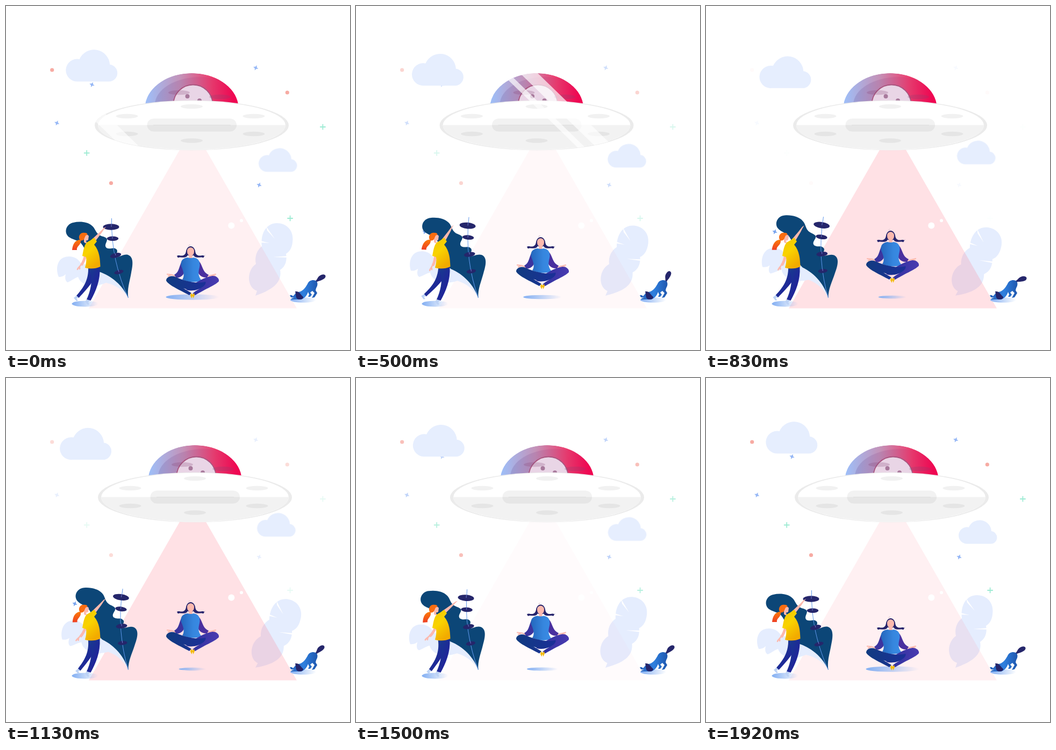
Write an HTML page that moves like this. It is 640 by 640 pixels and loops after 1.96 s.

```html
<!DOCTYPE html>
<html lang="en">
<head>
<meta charset="utf-8">
<style>
  html, body { margin: 0; width: 100%; height: 100%; overflow: hidden; background: #fff; }
  svg { display: block; width: 100vw; height: 100vh; }
</style>
</head>
<body>
<svg viewBox="0 0 640 640">
  <defs>
    <linearGradient id="shade"><stop stop-color="#82aef2"/><stop offset="1" stop-color="#82aef2" stop-opacity="0"/></linearGradient>
    <linearGradient id="glass"><stop offset=".02" stop-color="#9fbdf6"/><stop offset=".38" stop-color="#c492b8"/><stop offset=".72" stop-color="#ee3a6c"/><stop offset=".95" stop-color="#f5044f"/></linearGradient>
    <linearGradient id="inner"><stop stop-color="#6a5ca0" stop-opacity=".25"/><stop offset=".6" stop-color="#b03070" stop-opacity=".14"/><stop offset="1" stop-color="#f5004f" stop-opacity=".3"/></linearGradient>
    <linearGradient id="shirt"><stop stop-color="#2467bd"/><stop offset=".6" stop-color="#3686de"/><stop offset="1" stop-color="#3a8ce6"/></linearGradient>
    <linearGradient id="yellow" x2=".5" y2="1"><stop stop-color="#f0c400"/><stop offset=".5" stop-color="#f9d300"/><stop offset="1" stop-color="#f2ab00"/></linearGradient>
    <linearGradient id="pants" y2="1"><stop stop-color="#15408c"/><stop offset="1" stop-color="#2517a0"/></linearGradient>
    <linearGradient id="fold"><stop stop-color="#113b80"/><stop offset="1" stop-color="#1b2f98"/></linearGradient>
    <linearGradient id="fold2"><stop stop-color="#2a2f9b"/><stop offset="1" stop-color="#493bb0"/></linearGradient>
    <linearGradient id="hair" x2="0" y2="1"><stop stop-color="#fb7b08"/><stop offset="1" stop-color="#ee3f24"/></linearGradient>
    <linearGradient id="fur"><stop stop-color="#2560b8"/><stop offset=".5" stop-color="#2f80df"/><stop offset="1" stop-color="#1f57ae"/></linearGradient>
    <path id="bubble" d="M259 182A87.300 66 0 0 1 432 182Z"/>
    <clipPath id="dome"><use href="#bubble"/></clipPath>
    <clipPath id="hull"><use href="#bubble"/><ellipse cx="345.500" cy="222" rx="180" ry="46"/></clipPath>
    <clipPath id="low"><path d="M160 221.500H530V270H160Z"/></clipPath>
    <path id="cloud" d="M21 58.500A21 21 0 1 1 24 17A29.500 29.500 0 0 1 80.500 27A15.800 15.800 0 0 1 79 58.500Z"/>
    <path id="star" d="M0-5L1.500-1.500L5 0L1.500 1.500L0 5L-1.500 1.500L-5 0L-1.500-1.500Z" transform="rotate(22)"/>
    <path id="plus" d="M-5.300 0H5.300M0-5.300V5.300" stroke="#9debd3" stroke-width="1.800"/>
    <circle id="dot" r="3.600"/>
  </defs>

  <g id="dots" fill="#f7aba3"></g>
  <g id="stars" fill="#97b8f6"></g>
  <g id="pluses"></g>
  <use id="cloudA" href="#cloud" fill="#e6eefe"/>
  <use id="cloudB" href="#cloud" fill="#e6eefe"/>

  <!-- right plant and the light beam over it -->
  <g id="plant">
    <path fill="#e5edfe" d="M464 539L467 530C448 524 447 492 465 480C462 466 467 454 476 447C473 422 485 404 504 404C522 404 534 417 533.500 434C533 448 529 456 521 461C523 472 521 484 510 491C513 509 505 525 464 539Z"/>
    <path fill="#fff" d="M484 410L500 433L486 418ZM474 437L490 441L474 440ZM497 467L524 465V468Z"/>
  </g>
  <path id="beam" fill="#ff697d" d="M324 266H371L541 562.500H154Z"/>
  <g fill="#fff"><circle cx="419.300" cy="408.500" r="6"/><circle cx="438" cy="399.300" r="3"/></g>

  <!-- saucer -->
  <g id="ufo">
    <g clip-path="url(#dome)">
      <use href="#bubble" fill="url(#glass)"/>
      <ellipse cx="362" cy="184" rx="85" ry="52" fill="url(#inner)"/>
      <circle cx="348" cy="183" r="36.500" fill="#e9d5e6" stroke="#a9557f" stroke-width="1.800"/>
      <g fill="#a8799c"><circle cx="337.500" cy="168" r="4"/><circle cx="360" cy="176" r="4"/></g>
      <g fill="#804070" fill-opacity=".24"><ellipse cx="322" cy="161" rx="20" ry="4.300"/><ellipse cx="398" cy="169" rx="20" ry="4.300"/></g>
    </g>
    <ellipse cx="345.500" cy="222" rx="180.500" ry="46.500" fill="#ebebeb"/>
    <ellipse cx="345.500" cy="222" rx="174.500" ry="45.500" fill="#fff"/>
    <ellipse cx="345.500" cy="222" rx="174.500" ry="45" fill="#f2f2f2" clip-path="url(#low)"/>
    <rect x="262.500" y="209.500" width="166.500" height="24" rx="12" fill="#f2f2f2"/>
    <rect x="262.500" y="209.500" width="166.500" height="24" rx="12" fill="#e6e6e6" clip-path="url(#low)"/>
    <path d="M274 221.500H418" stroke="#dcdcdc" stroke-width=".8"/>
    <g id="spots" fill-opacity=".055"></g>
    <g clip-path="url(#hull)"><path id="shine" fill="#fff" fill-opacity=".68" d="M91 120H124L278.500 270H245.500ZM56 120H70L224.500 270H210.500Z"/></g>
  </g>

  <!-- girl with spinning plates -->
  <ellipse cx="147" cy="554" rx="24.500" ry="5.500" fill="url(#shade)"/>
  <use href="#star" fill="#7aa5ee" transform="translate(128 420)"/>
  <g id="leaf">
    <path fill="#e5edfe" d="M227.500 543C205 500 175 482 140 480C134 467 119 463 107 468C95 473 92 490 98 504C104 504 108 502 111 499C109 507 111 513 115 514C122 511 128 506 134 504C140 522 165 524 186 515C205 519 218 529 227.500 543Z"/>
    <path fill="#0c4677" d="M227.500 543C217 520 197 502 172 494C152 480 152 460 143 446C136 434 123 436 115 428C107 418 114 405 125 403C138 400 152 402 159 408C165 412 166 419 171 424C176 429 182 428 187 432C191 437 181 444 187 450C195 454 199 447 206 453C210 459 201 463 204 468C212 467 219 461 227 463C238 467 236 482 233 496C230 514 225 526 227.500 543Z"/>
    <path fill="none" stroke="#5f97ea" stroke-width="1" d="M196.500 395C196 425 199 450 204 473C210 500 219 525 227.500 543"/>
    <g fill="#25266b">
      <ellipse cx="195.500" cy="411" rx="15" ry="5.800"/>
      <ellipse cx="198.500" cy="432.700" rx="10.800" ry="4.200"/>
      <ellipse cx="204" cy="464" rx="10.500" ry="4.400" transform="rotate(-14 204 464)"/>
      <ellipse cx="210" cy="495" rx="8.800" ry="3.700" transform="rotate(-14 210 495)"/>
    </g>
    <path stroke="#7b8fdd" stroke-width=".8" d="M196 405V411M198 429V433M203 460L204 464M209 491L210 495"/>
  </g>
  <g id="backLeg">
    <path fill="url(#pants)" d="M153 486H172C169 506 154 523 135.500 543L131 539C144 524 154 510 153 486Z"/>
    <path fill="#bcd2f5" d="M131 539L135 543L131 544L134 548L131 549L126 543Z"/>
  </g>
  <path fill="url(#pants)" d="M154 485H174.500C176 510 167 531 157.500 548L150 546C157 531 161 512 158 498Z"/>
  <path fill="#bcd2f5" d="M150 546L156 548L153 551L155 555L152 556L147 550Z"/>
  <g id="foreArm">
    <path fill="none" stroke="#fcb9ae" stroke-width="5" d="M148 463Q145 476 140 482"/>
    <path fill="none" stroke="#fcb9ae" stroke-width="2.600" stroke-linecap="round" d="M140 481L134 488L133 490M137 485L137 489"/>
  </g>
  <g id="arm">
    <path fill="#fcb9ae" d="M160 434L174 421L182 413L186 411L182 416L178 422L165 439Z"/>
  </g>
  <path fill="url(#yellow)" d="M150 440L157 436L164 431L169 438L164 444C174 456 175 470 175.500 485Q162 491 147 487C149 480 150 473 149 467L142 465C144 455 145 446 150 440Z"/>
  <g id="tail"><path fill="url(#hair)" d="M139 435C130 434 124 442 123 454H132C131 446 140 446 139 435Z"/></g>
  <path fill="#fcb9ae" d="M145 430C145 425 152 424 154 428L153 435Q151 437 149 436L150 441Q147 442 145 439Z"/>
  <path fill="#f96c10" d="M136 432C135 424 142 421 146 422C151 422 152 424 151 426C147 426 147 431 145 434C142 438 137 437 136 432Z"/>

  <!-- meditating woman -->
  <ellipse id="shadow" cx="347" cy="541.500" fill="url(#shade)"/>
  <g id="woman">
    <g fill="#26246c">
      <path d="M334.500 462C334 442 353 442 352.500 462Q344 468 334.500 462Z"/>
      <path d="M336 453C335 461 332 464 328 464.500C323 465 321 463 318 465L316.500 462.500L320 468.500C325 465 337 473 339 460Z"/>
      <path d="M351 453C352 461 355 464 359 464.500C364 465 366 463 369 465L371 462.500L367 468.500C362 465 350 473 348 460Z"/>
    </g>
    <path fill="none" stroke="#d9c4cf" stroke-width="1" d="M340 447Q340 443 343 445"/>
    <path fill="#fcb9ae" d="M337 456C337 447 350 447 350 456Q350 462 346.500 464V472H340.500V464Q337 462 337 456Z"/>
    <g fill="none" stroke="#fcb9ae" stroke-width="2.200" stroke-linecap="round">
      <path d="M318 504L309 500L300 499M308 500L302 502.500"/>
      <path d="M370 504L382 501L390 499M381 501L389 502.500"/>
    </g>
    <path fill="#3c349f" d="M331 472C321 478 325 494 313 500L317 506C329 505 333 497 333 485Z"/>
    <path fill="#4a309f" d="M355 472C367 478 363 494 377 500L374 505C361 506 356 497 354 485Z"/>
    <path fill="url(#shirt)" d="M338 468Q344 470 349 468C359 469 362 477 360 486C357 497 358 503 364 511Q346 517 328 509C333 502 330 493 326 484C324 475 328 469 338 468Z"/>
    <path fill="url(#fold2)" d="M335 528C345 520 365 505 384 502C392 502 397 507 396 512C392 518 372 526 352 538L347 535C354 529 362 525 367 522Q350 533 335 528Z"/>
    <path fill="url(#fold)" d="M298 511C298 505 305 501 313 503C330 511 355 518 371 513C374 517 364 529 345 529Q337 528 330 525L345 534L341 538C325 529 303 520 298 511Z"/>
    <path fill="#f4bb0c" d="M344 534L347 537L350 534L351 538L348.500 544L347 539L345.500 544L343 539Z"/>
  </g>

  <!-- dog -->
  <ellipse cx="553" cy="547" rx="24" ry="4.800" fill="url(#shade)"/>
  <g id="wag"><path fill="#25266b" d="M575 512C580 509 579 504 585 501C589 499 592 499 594 501C596 505 592 508 587 510C582 512.500 580 511 577 515Z"/></g>
  <path fill="url(#fur)" d="M528 538Q532 537 534 540L541 532C550 533 556 526 561 517C564 510 571 509 576 511C581 514 580 520 577 525L576 529L579 534L574 542L569 543L574 534L570 530L566 533L569 537L566 541H562L564 537L562 532C560 538 556 544 549 546H530Q531 543 537 543L530 542Z"/>
  <path fill="#25266b" d="M538 531C547 530 548 538 553 541Q554 546 545 546C538 545 540 538 538 531Z"/>
</svg>
<script>
const LOOP = 1960;
const TIMES = [0, 290, 500, 830, 1130, 1500, 1920];
const $ = id => document.getElementById(id);
const set = (id, transform) => $(id).setAttribute('transform', transform);

// Smooth curve through the keys without overshoot, closed over the loop.
function track(values, times = TIMES) {
  const t = [...times, LOOP], v = [...values, values[0]], n = times.length;
  const slope = times.map((_, i) => (v[i + 1] - v[i]) / (t[i + 1] - t[i]));
  const tangent = v.map((_, i) => {
    const a = slope[(i + n - 1) % n], b = slope[i % n];
    return a * b > 0 ? 2 * a * b / (a + b) : 0;
  });
  return now => {
    let i = 0;
    while (now >= t[i + 1]) i++;
    const h = t[i + 1] - t[i], x = (now - t[i]) / h, y = 1 - x;
    return v[i] * y * y * (1 + 2 * x) + v[i + 1] * x * x * (3 - 2 * x)
      + h * x * y * (tangent[i] * y - tangent[i + 1] * x);
  };
}

const sway = track([0, .33, .61, .99, .93, .46, 0]);
const drift = track([0, .21, .57, 1, .96, .4, 0]);
const swing = track([0, -5, -9.5, -3, 6, 10, 0]);
const reach = track([0, -4, -9, -7, -1, 8, 0]);
const lift = track([0, 6, 17, 29, 30, 25.5, 0]);
const glow = track([.1, .06, .042, .2, .195, .025, .1]);
const wag = track([0, -33, -37, -35, 14, -10, -36, -10, 14, 0],
  [0, 290, 395, 500, 830, 1130, 1315, 1500, 1670, 1920]);
const fades = {
  dots: track([1, .72, .5, .06, .42, .75, 1]),
  stars: track([1, .65, .45, .08, .22, .6, 1]),
  pluses: track([1, .72, .4, .03, .25, .75, 1])
};

const scatter = (id, shape, places) => $(id).innerHTML = places
  .map(([x, y]) => `<use href="#${shape}" transform="translate(${x} ${y})"/>`).join('');
scatter('dots', 'dot', [[85.7, 119], [523.3, 161], [195.5, 329.5]]);
scatter('stars', 'star', [[464.7, 115], [94.7, 217.7], [471, 333], [160, 146.3]]);
scatter('pluses', 'plus', [[150.2, 273.5], [589.4, 225], [528.6, 395]]);
$('spots').innerHTML = [[225, 205], [345.5, 187], [461, 205], [225, 238], [345.5, 250.5], [461, 238]]
  .map(([x, y]) => `<ellipse cx="${x}" cy="${y}" rx="20.5" ry="4.2"/>`).join('');

function draw(now) {
  const t = now % LOOP, s = sway(t), d = drift(t), dx = swing(t), h = lift(t);
  for (const id in fades) $(id).setAttribute('opacity', fades[id](t));
  $('beam').setAttribute('opacity', glow(t));
  set('cloudA', `translate(${112.7 - 12 * s} ${82 + 12.5 * s})`);
  set('cloudB', `translate(${471 - 3 * d} ${265 - 14 * d}) scale(.745)`);
  set('plant', `rotate(${9.4 * s} 465 539)`);
  set('leaf', `rotate(${8.5 * s} 227.5 543)`);
  set('ufo', `translate(${dx})`);
  set('shine', `translate(${.00092 * t * t - 22 - dx})`);
  set('arm', `rotate(${reach(t)} 162 436)`);
  set('foreArm', `rotate(${dx} 147 465)`);
  set('backLeg', `rotate(${-.55 * dx} 163 490)`);
  set('tail', `rotate(${-.4 * dx} 138 436)`);
  set('woman', `translate(0 ${-h})`);
  $('shadow').setAttribute('rx', 49.5 - .8 * h);
  $('shadow').setAttribute('ry', 5.2 - .085 * h);
  set('wag', `rotate(${wag(t)} 577 513)`);
}

const start = performance.now();
function tick() {
  draw(performance.now() - start);
  requestAnimationFrame(tick);
}
tick();
</script>
</body>
</html>
```
